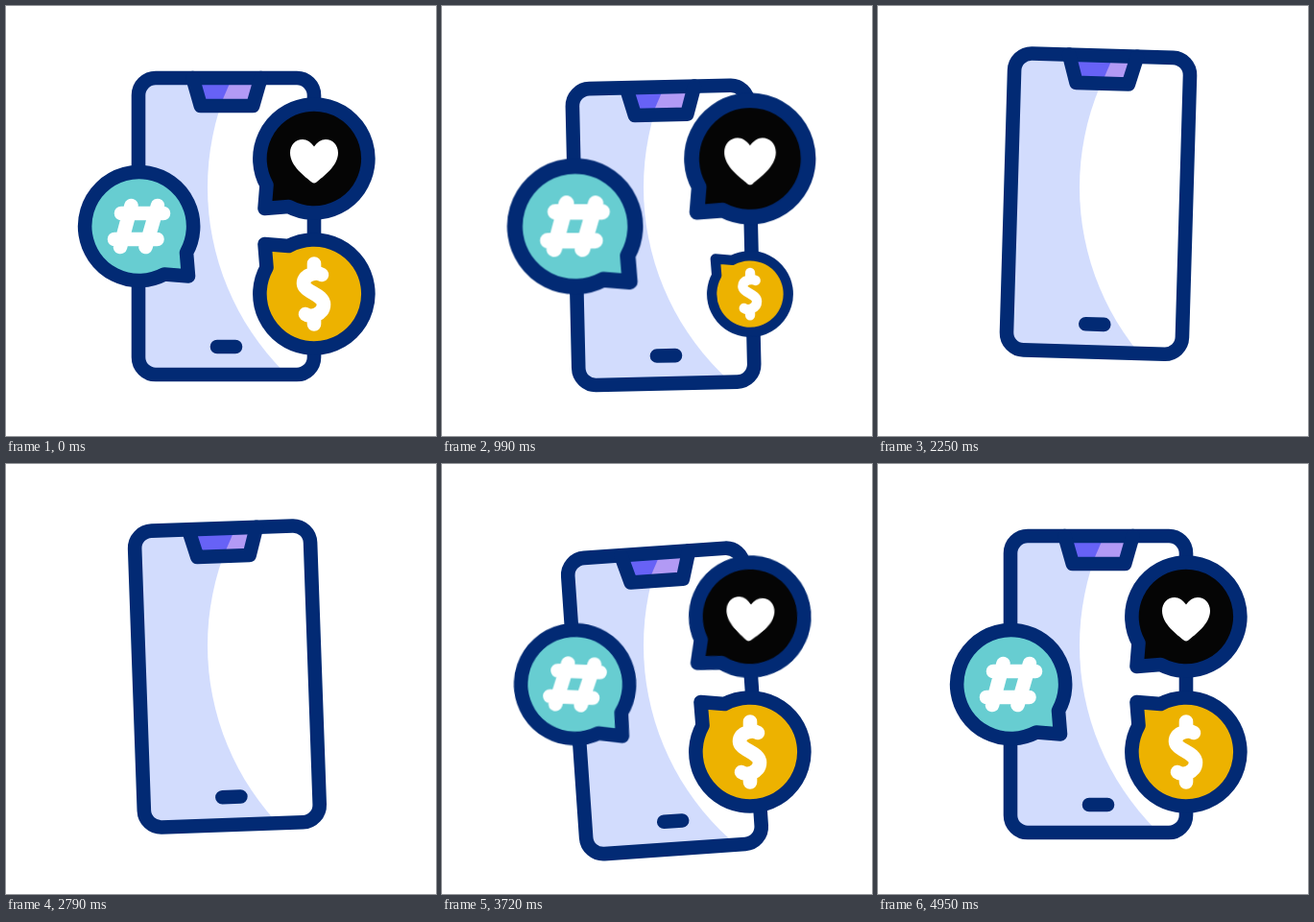
An HTML page that plays this animation: 448x448 px, repeating every 5.1 s.

```html
<!DOCTYPE html>
<html lang="en">
<head>
<meta charset="utf-8">
<title>Phone with reactions</title>
<style>
  html, body { margin: 0; width: 100%; height: 100%; overflow: hidden; background: #fff; }
  svg { display: block; width: 100vw; height: 100vh; }

  :root { --loop: 5100ms; --swing: cubic-bezier(.37, 0, .63, 1); }

  .line { fill: none; stroke: #022a74; stroke-width: 14.6; stroke-linecap: round; stroke-linejoin: round; }
  .glyph { fill: none; stroke: #fff; stroke-width: 14.6; stroke-linecap: round; stroke-linejoin: round; }

  .phone {
    transform-origin: 229.5px 229.5px;
    animation: drift var(--loop) var(--swing) infinite, tilt var(--loop) var(--swing) infinite;
  }
  .bubble {
    animation: pop var(--loop) var(--d) var(--swing) infinite backwards, wobble var(--loop) var(--d) var(--swing) infinite backwards;
  }
  .burst { fill: none; stroke-width: 14.6; stroke-linecap: round; }
  .burst path {
    opacity: 0;
    animation: fly var(--loop) var(--d) linear infinite backwards, fade var(--loop) var(--d) linear infinite backwards;
  }
  .burst .solid { animation-name: fly, cut; }

  /* dip, leap, slow fall, settle */
  @keyframes drift {
    0%, 10.59% { translate: 0 0; }
    17.06% { translate: 2.5px 18.5px; }
    27.25% { translate: -9px -54px; }
    30.59% { translate: -10.5px -43px; animation-timing-function: linear; }
    44.12% { translate: 0 -23.4px; animation-timing-function: linear; }
    72.35% { translate: 2.5px 17.5px; }
    85.29%, 100% { translate: 0 0; }
  }
  @keyframes tilt {
    0%, 14.9% { rotate: 0deg; }
    29.31% { rotate: -6deg; }
    39.8% { rotate: 6deg; }
    50.39% { rotate: -6deg; }
    61.47% { rotate: 6deg; }
    72.35% { rotate: -4deg; }
    85.29% { rotate: 1.8deg; }
    97.06%, 100% { rotate: 0deg; }
  }
  @keyframes pop {
    0%, 3.53% { scale: 1; }
    12.94% { scale: 1.125; animation-timing-function: cubic-bezier(.33, 0, .67, .33); }
    23.53% { scale: 0; }
    55.2% { scale: 0; animation-timing-function: cubic-bezier(.33, .67, .67, 1); }
    61.96%, 100% { scale: 1; }
  }
  @keyframes wobble {
    0% { rotate: 0deg; animation-timing-function: step-end; }
    24%, 55.2% { rotate: -30deg; }
    63.73% { rotate: 6deg; }
    70.59%, 100% { rotate: 0deg; }
  }
  @keyframes fly {
    0%, 22.35% { d: path("M0 0h.01"); }
    24.12% { d: path("M14 0h3"); animation-timing-function: cubic-bezier(.33, .67, .67, 1); }
    27.06%, 100% { d: path("M22.5 0h.01"); }
  }
  @keyframes fade {
    0% { opacity: 0; animation-timing-function: step-end; }
    22.35%, 27.65% { opacity: 1; }
    31.18%, 100% { opacity: 0; }
  }
  @keyframes cut {
    0% { opacity: 0; animation-timing-function: step-end; }
    22.35% { opacity: 1; animation-timing-function: step-end; }
    29.8%, 100% { opacity: 0; }
  }
</style>
</head>
<body>
<svg viewBox="0 0 448 448">
  <defs>
    <clipPath id="screen"><rect class="phone" x="138" y="75" width="183" height="309" rx="18"/></clipPath>
    <clipPath id="notch"><path class="phone" d="M194.5 75L202.8 104H257.2L265.5 75Z"/></clipPath>
    <path id="body" d="M-26.5-50A56.5 56.5 0 1 1-49.5-27.5L-51.5-52Z"
      stroke="#022a74" stroke-width="14.6" stroke-linejoin="round"/>
  </defs>

  <!-- the shine stays put while the phone moves over it -->
  <g clip-path="url(#screen)">
    <rect width="448" height="448" fill="#d2dcfd"/>
    <circle cx="482" cy="189" r="272" fill="#fff"/>
  </g>
  <g clip-path="url(#notch)">
    <rect width="448" height="448" fill="#6762f6"/>
    <path d="M267.7 0H448V140H207.5Z" fill="#b29af5"/>
  </g>
  <g class="phone line">
    <rect x="138" y="75" width="183" height="309" rx="18"/>
    <path d="M194.5 75L202.8 104H257.2L265.5 75M220 355H239"/>
  </g>

  <g style="--d: 540ms">
    <g class="burst" transform="translate(321 159)" stroke="#edb200">
      <path class="solid"/>
      <path transform="rotate(90)"/>
      <path transform="rotate(180)"/>
      <path transform="rotate(270)"/>
    </g>
    <g transform="translate(321 159)">
      <g class="bubble">
        <use href="#body" transform="scale(1 -1)" fill="#050505"/>
        <path fill="#fff" d="M0-12.5C-3-17-7.5-20-12-20C-19.5-20-25-14-25-6C-25 8-9 19-2.5 24.5Q0 26.5 2.5 24.5C9 19 25 8 25-6C25-14 19.5-20 12-20C7.5-20 3-17 0-12.5Z"/>
      </g>
    </g>
  </g>

  <g style="--d: 270ms">
    <g class="burst" transform="translate(140 228.8)" stroke="#e9b71c">
      <path/>
      <path transform="rotate(90)"/>
      <path class="solid" transform="rotate(180)"/>
      <path transform="rotate(270)"/>
    </g>
    <g transform="translate(138.5 229.5)">
      <g class="bubble">
        <use href="#body" transform="scale(-1)" fill="#67cdd1"/>
        <path class="glyph" d="M-8-21.5L-19.5 21.5M19.5-21.5L7 21.5M-18.5-13.5H25.5M-25.5 13.5H19"/>
      </g>
    </g>
  </g>

  <g style="--d: 0ms">
    <g class="burst" transform="translate(321 300.5)" stroke="#ff8c00">
      <path class="solid"/>
      <path transform="rotate(90)"/>
      <path transform="rotate(180)"/>
      <path transform="rotate(270)"/>
    </g>
    <g transform="translate(321 300)">
      <g class="bubble">
        <use href="#body" fill="#edb200"/>
        <path class="glyph" d="M8-20C3-23-11-21-11-11C-11-2 10 0 10 11C10 22-4 25-9 21M0-31.5V-22M0 23V31.5"/>
      </g>
    </g>
  </g>
</svg>
</body>
</html>
```
